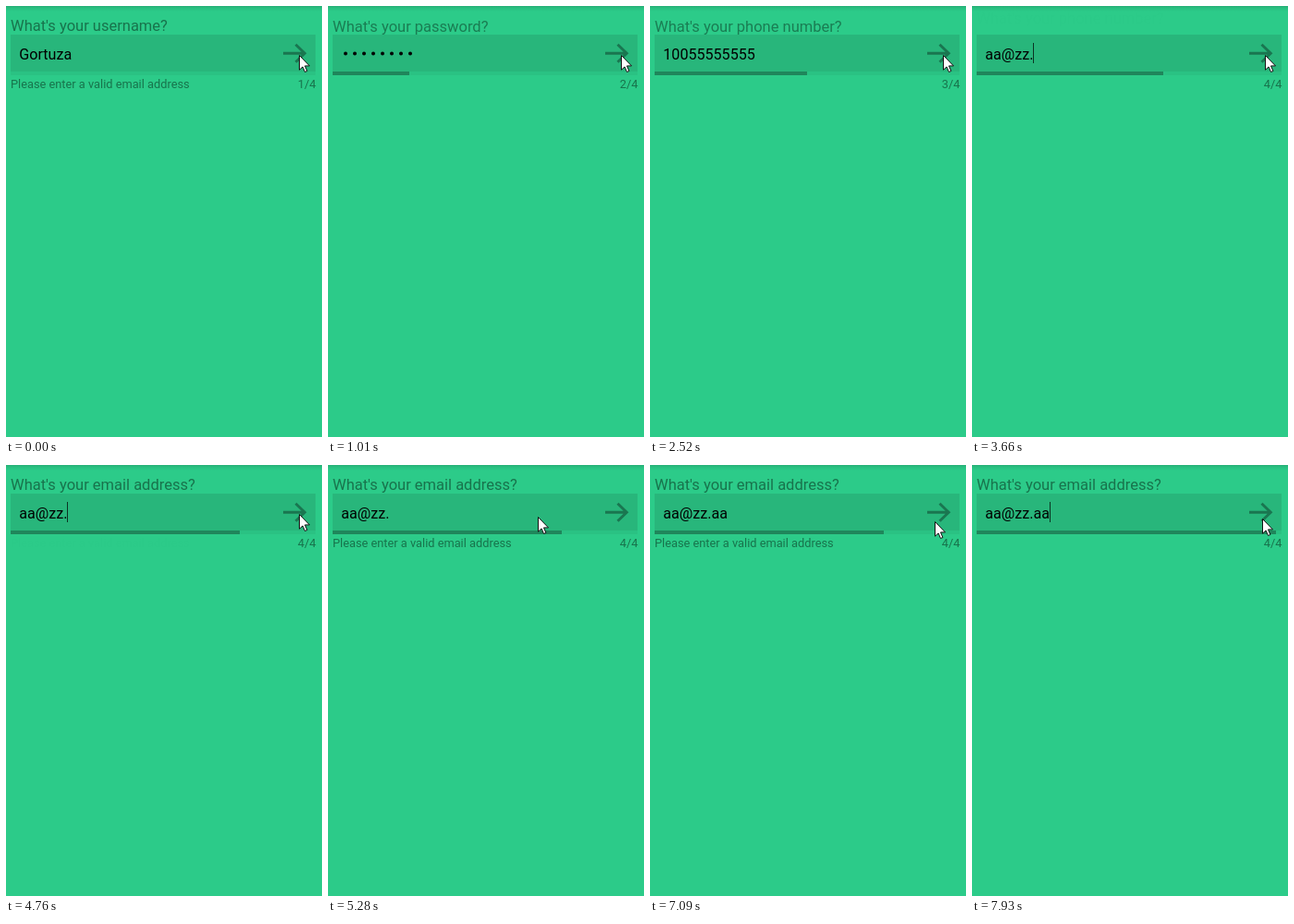
Recreate the animation shown at these times as an HTML page. Size 342 by 467 pixels, loop 8000 ms.

```html
<!DOCTYPE html>
<html lang="en">
<head>
<meta charset="utf-8">
<title>Step form</title>
<style>
  html, body { margin: 0; width: 100%; height: 100%; overflow: hidden; background: #2ccb89; }
  svg { display: block; width: 342px; height: 467px; }
  text { font-family: Roboto, "Open Sans", sans-serif; white-space: pre; }
  .soft { fill: #18734c; }
  .label { font-size: 16.5px; }
  .note { font-size: 12.8px; }
  .value { font-size: 16.1px; }
</style>
</head>
<body>
<svg viewBox="0 0 342 467">
  <defs>
    <linearGradient id="shade" x2="0" y2="1">
      <stop stop-color="#26ae76"/>
      <stop offset=".4" stop-color="#29bf80"/>
      <stop offset="1" stop-color="#2ccb89"/>
    </linearGradient>
  </defs>
  <rect width="342" height="467" fill="#2ccb89"/>
  <rect width="342" height="6" fill="url(#shade)"/>
  <text id="label" class="soft label" x="5" y="27"></text>
  <rect x="5" y="31" width="330" height="40" fill="#28b67b"/>
  <rect x="5" y="71" width="330" height="4" fill="#2ac283"/>
  <rect id="bar" x="5" y="71" height="4" fill="#1f865b"/>
  <text id="value" class="value" x="14.3" y="57.5"></text>
  <path id="dots" d="M19 51.5H89.5" stroke="#000" stroke-width="4" stroke-linecap="round" stroke-dasharray="0 10"/>
  <rect id="caret" y="40" width="1" height="22" fill="#0b3322"/>
  <path d="M300 51.2H323M313.5 41.7L323.3 51.2L313.5 60.7" fill="none" stroke="#1a7650" stroke-width="2.9"/>
  <text id="error" class="soft note" x="5" y="89">Please enter a valid email address</text>
  <text id="count" class="soft note" x="335.5" y="89" text-anchor="end"></text>
  <path id="pointer" d="M.5 .5V16.2L4.1 12.9L6.5 18.5L8.9 17.5L6.5 11.9H11.5Z" fill="#fff" stroke="#111"/>
</svg>
<script>
const LOOP = 8000;
const REFRESH = 138.9; // the picture is redrawn at this pace
const ERROR_AT = 4720;
const TYPE_AT = 6250;
const TYPE_GAP = 415;

const steps = [
  { topic: 'username', value: 'Gortuza', submit: 410 },
  { topic: 'password', value: '', submit: 1940 },
  { topic: 'phone number', value: '10055555555', submit: 3377 },
  { topic: 'email address', value: 'aa@zz.aa', submit: 7505 },
];
const [first, , , last] = steps;

const $ = id => document.getElementById(id);
const set = (id, attrs) => {
  for (const name in attrs) $(id).setAttribute(name, attrs[name]);
};
const clamp = v => Math.min(1, Math.max(0, v));
const ease = v => (1 - Math.cos(Math.PI * clamp(v))) / 2;
const mix = (a, b, p) => a + (b - a) * p;

// The old question rises and fades, then the new one comes up from below.
function drawLabel(t, index) {
  const previous = steps[index - 1];
  const since = previous ? t - previous.submit : LOOP;
  const leaving = since < 250;
  const p = leaving ? ease(since / 250) : ease((since - 250) / 400);
  $('label').textContent = `What's your ${(leaving ? previous : steps[index]).topic}?`;
  set('label', {
    opacity: leaving ? 1 - p : p,
    transform: `translate(0 ${leaving ? -8 * p : 10 * (1 - p)})`,
  });
}

function drawValue(t, step) {
  const typed = Math.max(0, Math.floor((t - TYPE_AT) / TYPE_GAP) + 1);
  const masked = step.topic === 'password';
  $('value').textContent = step === last ? step.value.slice(0, 6 + typed) : step.value;
  set('dots', { opacity: masked ? 1 : 0 });

  const width = masked ? 79 : $('value').getComputedTextLength();
  const blink = t % 1000;
  set('caret', {
    x: Math.round(14 + width),
    opacity: blink >= 510 && blink < 960 ? 1 : 0,
  });
}

// Leaves the button over a small arc and returns from below.
function drawPointer(t) {
  const out = clamp((t - 4870) / 550);
  const back = ease((t - 6660) / 496);
  const x = mix(mix(317, 196, out), 314, back);
  const y = mix(mix(53, 63, out), 58, back)
    - 6 * Math.sin(Math.PI * out) + 15 * Math.sin(Math.PI * back);
  set('pointer', { transform: `translate(${Math.round(x)} ${Math.round(y)})` });
}

function draw(t) {
  const done = steps.filter(step => step.submit <= t).length;
  const index = Math.min(done, steps.length - 1);
  const progress = steps.reduce((sum, step) => sum + ease((t - step.submit) / 500), 0);
  const failed = t < first.submit ? 1 : t < last.submit ? clamp((t - ERROR_AT) / 200) : 0;

  drawLabel(t, index);
  drawValue(t, steps[index]);
  drawPointer(t);
  set('bar', { width: Math.round(330 * progress / steps.length) });
  set('error', { opacity: failed });
  $('count').textContent = `${index + 1}/${steps.length}`;
}

const start = performance.now();
function frame() {
  const t = (performance.now() - start) % LOOP;
  draw(Math.floor(t / REFRESH) * REFRESH);
  requestAnimationFrame(frame);
}
frame();
</script>
</body>
</html>
```
